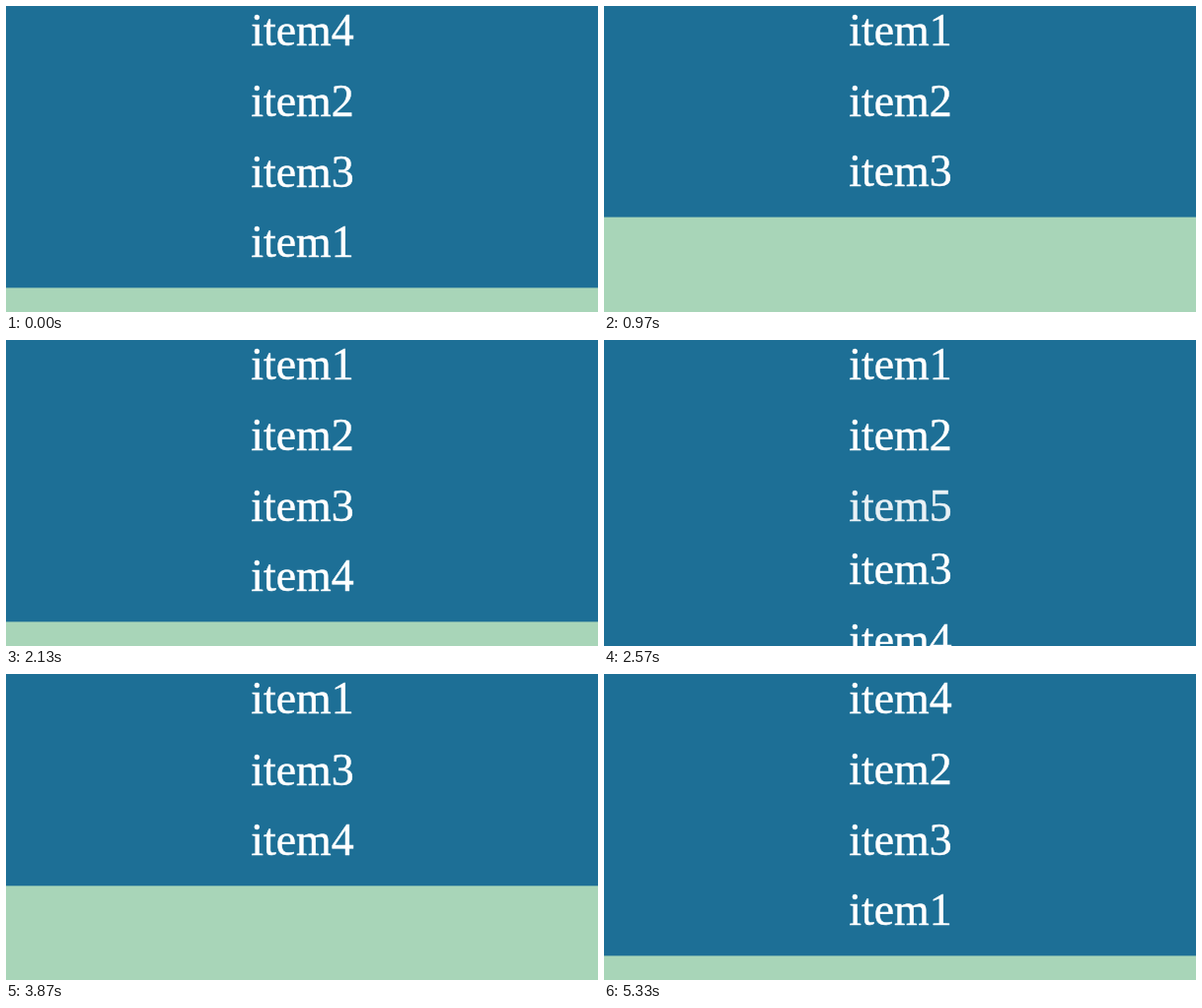
Animation, 600 px wide and 311 px high, one loop 5.66 s. Source, as an HTML page with a canvas:

```html
<!DOCTYPE html>
<html lang="en">
<head>
<meta charset="utf-8">
<style>
  html, body { margin: 0; width: 100%; height: 100%; overflow: hidden; background: #a8d5b8; }
  canvas { display: block; }
</style>
</head>
<body>
<canvas width="600" height="311"></canvas>
<script>
const LOOP = 5660, RESET = 30, FIRST = 266, INTERVAL = 1001.5;
const ROW_HEIGHT = 71.6, BASELINE = 40.4, CENTER = 300.4;
const BLUE = "#1d6f96";

// Rows in order for each stage: "+" grows in, "-" shrinks away.
const stages = ["+1 +2 +3", "1 2 3 +4", "1 2 +5 3 4", "1 -2 -5 3 4", "4 +2 3 1"]
  .map(stage => stage.split(" "));

const canvas = document.querySelector("canvas");
const ctx = canvas.getContext("2d");
ctx.font = '45.8px "Liberation Serif", "Times New Roman", serif';
ctx.textAlign = "center";
ctx.lineWidth = 0.5;

// Critically damped spring, stiffness 170.
function spring(ms) {
  const x = Math.sqrt(170) * ms / 1000;
  return 1 - (1 + x) * Math.exp(-x);
}

function pose(time) {
  if (time < RESET) time += LOOP;
  if (time < FIRST) return [];
  const index = Math.min(Math.floor((time - FIRST) / INTERVAL), stages.length - 1);
  const progress = spring(time - FIRST - index * INTERVAL);
  return stages[index].map(entry => ({
    label: "item" + entry.slice(-1),
    size: entry[0] === "+" ? progress : entry[0] === "-" ? 1 - progress : 1
  }));
}

function drawRow(label, size, top) {
  ctx.save();
  ctx.beginPath();
  ctx.rect(0, top, canvas.width, size * ROW_HEIGHT);
  ctx.clip();
  ctx.fillStyle = ctx.strokeStyle = `color-mix(in srgb, #fff ${size * 100}%, ${BLUE})`;
  ctx.fillText(label, CENTER, top + BASELINE);
  ctx.strokeText(label, CENTER, top + BASELINE);
  ctx.restore();
}

function draw() {
  const items = pose(performance.now() % LOOP);
  const total = items.reduce((sum, item) => sum + item.size, 0);
  ctx.clearRect(0, 0, canvas.width, canvas.height);
  ctx.fillStyle = BLUE;
  ctx.fillRect(0, 0, canvas.width, total * ROW_HEIGHT);

  let top = 0;
  for (const { label, size } of items) {
    drawRow(label, size, top);
    top += size * ROW_HEIGHT;
  }
  requestAnimationFrame(draw);
}
draw();
</script>
</body>
</html>
```
